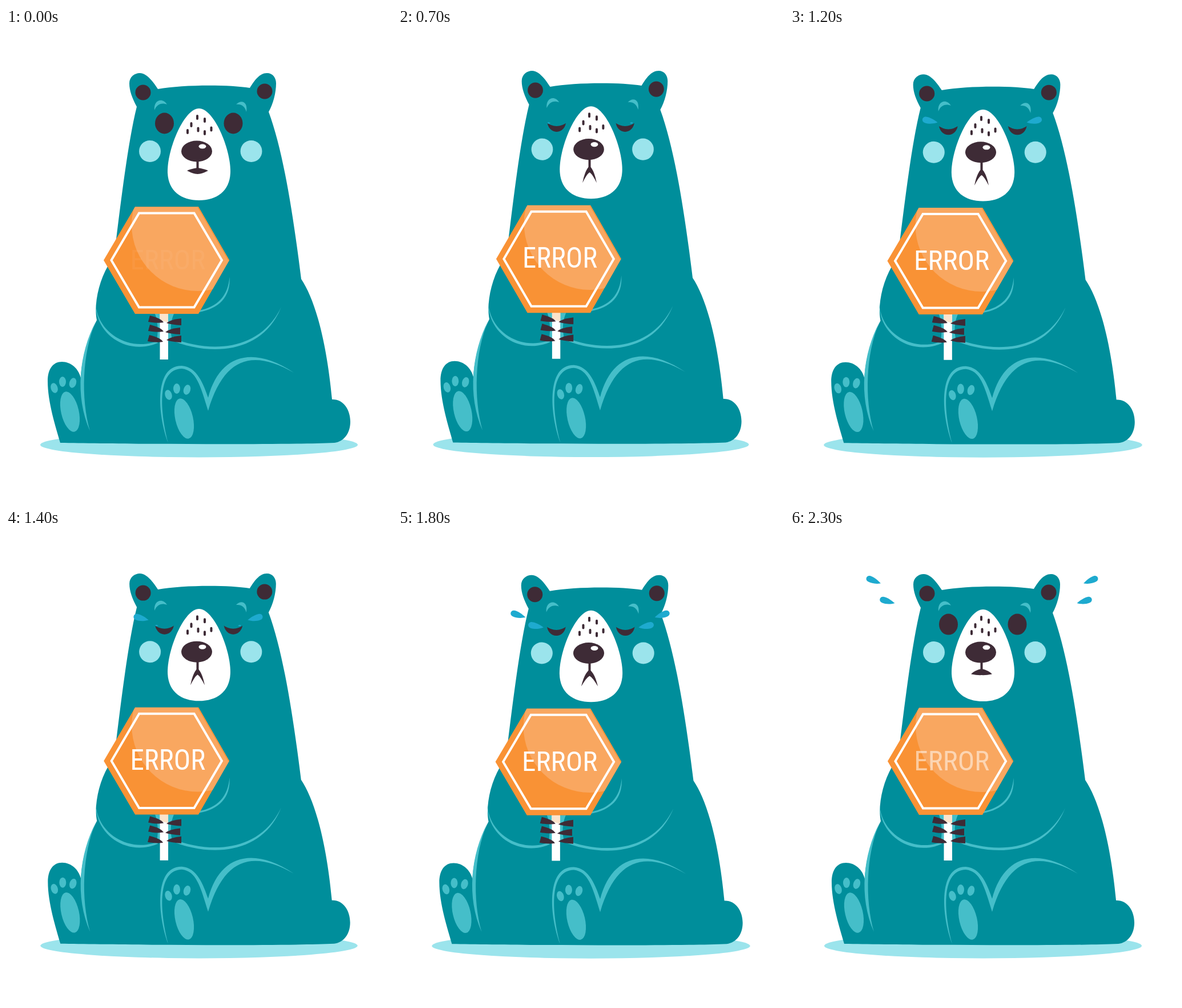
Animation, 676 px wide and 829 px high, one loop 2.4 s. Source, as an HTML page:

```html
<!DOCTYPE html>
<html>
<head>
<meta charset="utf-8">
<style>
html, body { margin: 0; width: 100%; height: 100%; overflow: hidden; background: #fff; }
svg { display: block; width: 676px; height: 829px; }
text { font: 49px "Roboto Condensed", Roboto, "Liberation Sans", sans-serif; font-stretch: 75%; }
.teal { fill: #008e9b; }
.light { fill: #45bec9; }
.pale { fill: #9be4ec; }
.dark { fill: #3e2b36; }
.tear { fill: #1eaacf; }
</style>
</head>
<body>
<svg viewBox="0 0 676 829">
<defs>
  <path id="hex" d="M171 407L226 313.5H337L391 407L337 501H226Z"/>
  <clipPath id="signClip"><use href="#hex"/></clipPath>
  <clipPath id="lidClip"><path id="lid"/></clipPath>
  <ellipse id="eye" cx="277.5" cy="167" rx="16.5" ry="18.5" clip-path="url(#lidClip)"/>
  <path id="drop" d="M14 0C6 5-2 6-7 5.5C-15 5-15-5-7-5.5C-2-6 6-4 14 0Z"/>
  <path id="clawL" d="M252 504L249 515Q265 518 276 516Q272 509 252 504Z"/>
  <path id="clawR" d="M307 509V521Q290 520 281 517Q288 511 307 509Z"/>
  <g id="pads">
    <ellipse rx="15.5" ry="36" transform="translate(112 672.5) rotate(-13)"/>
    <ellipse rx="6" ry="9" transform="translate(84.5 631) rotate(-17)"/>
    <ellipse rx="6" ry="9" transform="translate(99 620)"/>
    <ellipse rx="6" ry="9" transform="translate(117 622) rotate(17)"/>
  </g>
</defs>
<g id="bear">
  <ellipse class="pale" cx="338" cy="730.5" rx="278" ry="22"/>
  <path class="teal" d="M95 727C87 699 73 656 73 619C73 598 82 585 98 585C114 585 127 597 131 613
    C133 575 145 540 159 512C154 487 161 447 179 416L193 370C202 298 214 198 229 138
    C221 123 216 110 216 97C216 85 226 79 234 79C246 79 257 93 266 107C310 99 390 99 427 105
    C435 92 444 79 457 79C467 79 473 87 473 97C473 113 468 133 460 147C485 215 502 320 517 440
    C540 474 561 545 571 651C590 650 603 668 603 690C603 710 592 725 575 727C480 731 200 729 95 727Z"/>
  <g class="light">
    <path d="M157 515C128 570 120 645 147 706C131 650 133 570 157 515Z"/>
    <path d="M157 484C158 540 215 574 266 552L264 549C215 567 161 535 157 484Z"/>
    <path d="M286 546C360 577 450 570 482 489C445 566 360 570 292 544Z"/>
    <path d="M391.5 436C394 472 372 492 338 498V495C370 489 389 470 391.5 436Z"/>
    <path d="M284 727C266 680 258 591 308 592C335 594 346 625 354 648C374 572 432 556 504 604
      C432 563 382 576 354 671C340 625 333 600 308 597C266 598 268 665 284 727Z"/>
    <path d="M260 144C258 126 274 121 282 134C272 130 264 134 260 144Z"/>
    <path d="M403 134C411 125 424 128 421 147C418 137 412 133 403 134Z"/>
    <path d="M261 501H270V549H264C267 530 266 515 261 501ZM284 501H294C288 515 287 530 291 546H284Z"/>
    <use href="#pads"/>
    <use href="#pads" x="200" y="12"/>
  </g>
  <g class="pale"><circle cx="252" cy="216" r="19"/><circle cx="429.5" cy="216" r="19"/></g>
  <g class="dark">
    <circle cx="240" cy="113" r="13.5"/><circle cx="453" cy="111" r="13.5"/>
    <use href="#eye"/><use href="#eye" x="120.5"/>
  </g>
  <path fill="#fff" d="M338 141C364 141 393 211 393 251C393 285 370 302 338 302C306 302 283 285 283 251C283 211 312 141 338 141Z"/>
  <path fill="none" stroke="#3e2b36" stroke-width="4" stroke-linecap="round"
    d="M335 154v5M348 159v5M324.5 167v5M359.5 174.5v5M336.5 175.5v5M318 179v5M348 181v5M335.5 232v16"/>
  <ellipse class="dark" cx="334" cy="216" rx="27" ry="18.5"/>
  <ellipse fill="#fff" cx="344" cy="207.5" rx="6.5" ry="4"/>
  <path id="mouth" class="dark"/>
  <path fill="#fff" d="M269.5 500H284V581H269.5Z"/>
  <path fill="#fbe3cb" d="M269.5 500H284V516L269.5 512Z"/>
  <g class="dark">
    <use href="#clawL"/><use href="#clawL" y="16"/><use href="#clawL" x="-1" y="34"/>
    <use href="#clawR"/><use href="#clawR" x="-2" y="16"/><use href="#clawR" y="30"/>
  </g>
  <use href="#hex" fill="#f99235"/>
  <g clip-path="url(#signClip)">
    <circle cx="336" cy="345" r="116" fill="#f9a760"/>
    <path d="M337 313.5L391 407" stroke="#f99235" stroke-width="3"/>
  </g>
  <path fill="none" stroke="#fff" stroke-width="4" d="M184.5 407L233 324.5H329.5L378 407L329.5 489.5H233Z"/>
  <text id="word" x="283.3" y="422.7" text-anchor="middle" fill="#fff">ERROR</text>
  <g id="tears" class="tear"></g>
</g>
</svg>
<script>
const $ = id => document.getElementById(id);
const LOOP = 2400, STEP = 100, SOB = 700, SOB_END = 1900;
const ramp = (t, from, to) => Math.max(0, Math.min(1, (t - from) / (to - from)));
const easeOut = p => 1 - (1 - p) ** 3;

// drift: steady climb, leap: late burst upward, extra: longer reach on the right
const tears = [
  { born: 700, reach: 118, drift: 30, leap: 50, tilt: 22, extra: 0 },
  { born: 1400, reach: 94, drift: 4, leap: 40, tilt: 16, extra: 13 }
];

// Slow breath, plus a jolt that swings out while sobbing.
function sink(t) {
  const age = t - SOB, breath = .9 * Math.sin(Math.PI * t / LOOP);
  if (age < 0 || t >= SOB_END) return breath;
  return breath - 4.8 * Math.exp(-age / 800) * Math.cos(2 * Math.PI * age / 750);
}

function tearPair(t, { born, reach, drift, leap, tilt, extra }) {
  if (t < born) return "";
  const p = ramp(t, born, LOOP - STEP), size = Math.min(1, .2 + (t - born) / 500);
  const out = (p + p ** 4) / 2, y = 170 - drift * p - leap * p ** 12;
  const tear = (x, flip) => `<use href="#drop" transform="translate(${x} ${y})
    scale(${flip * size} ${size}) rotate(${tilt * Math.sqrt(p)})"/>`;
  return tear(264 - reach * out, 1) + tear(409 + (reach + extra) * out, -1);
}

function mouthPath(halfWidth, y) {
  const c = 335.5, low = 256, bend = y - 250;
  const l = k => c - halfWidth * k, r = k => c + halfWidth * k;
  const top = 247 + bend * .2, under = low + bend * .13;
  return `M${l(1)} ${y}Q${l(.65)} ${top} ${c} 245Q${r(.65)} ${top} ${r(1)} ${y}
    Q${r(.4)} ${under} ${c} ${low}Q${l(.4)} ${under} ${l(1)} ${y}Z`;
}

function draw(t) {
  const s = sink(t) / 750;
  $("bear").setAttribute("transform", `translate(338 829) scale(${1 + s} ${1 - s}) translate(-338 -829)`);

  // The face closes and opens symmetrically within the loop.
  const u = Math.min(t, LOOP - t);
  const shut = easeOut(ramp(u, 100, 700)), lid = 142 + 26 * shut, dip = 5 + 2.5 * shut;
  $("lid").setAttribute("d", `M258 ${lid}Q277.5 ${lid + 2 * dip} 297 ${lid}V190H258Z`);
  $("mouth").setAttribute("d", mouthPath(18.5 - 6 * ramp(u, 400, 700), 250 + 24.5 * ramp(u, 0, 600)));
  $("word").setAttribute("opacity", Math.min(1, .05 + u / 210));
  $("tears").innerHTML = tears.map(tear => tearPair(t, tear)).join("");
}

const start = performance.now();
function tick() {
  draw(Math.floor((performance.now() - start) % LOOP / STEP) * STEP);
  requestAnimationFrame(tick);
}
tick();
</script>
</body>
</html>
```
